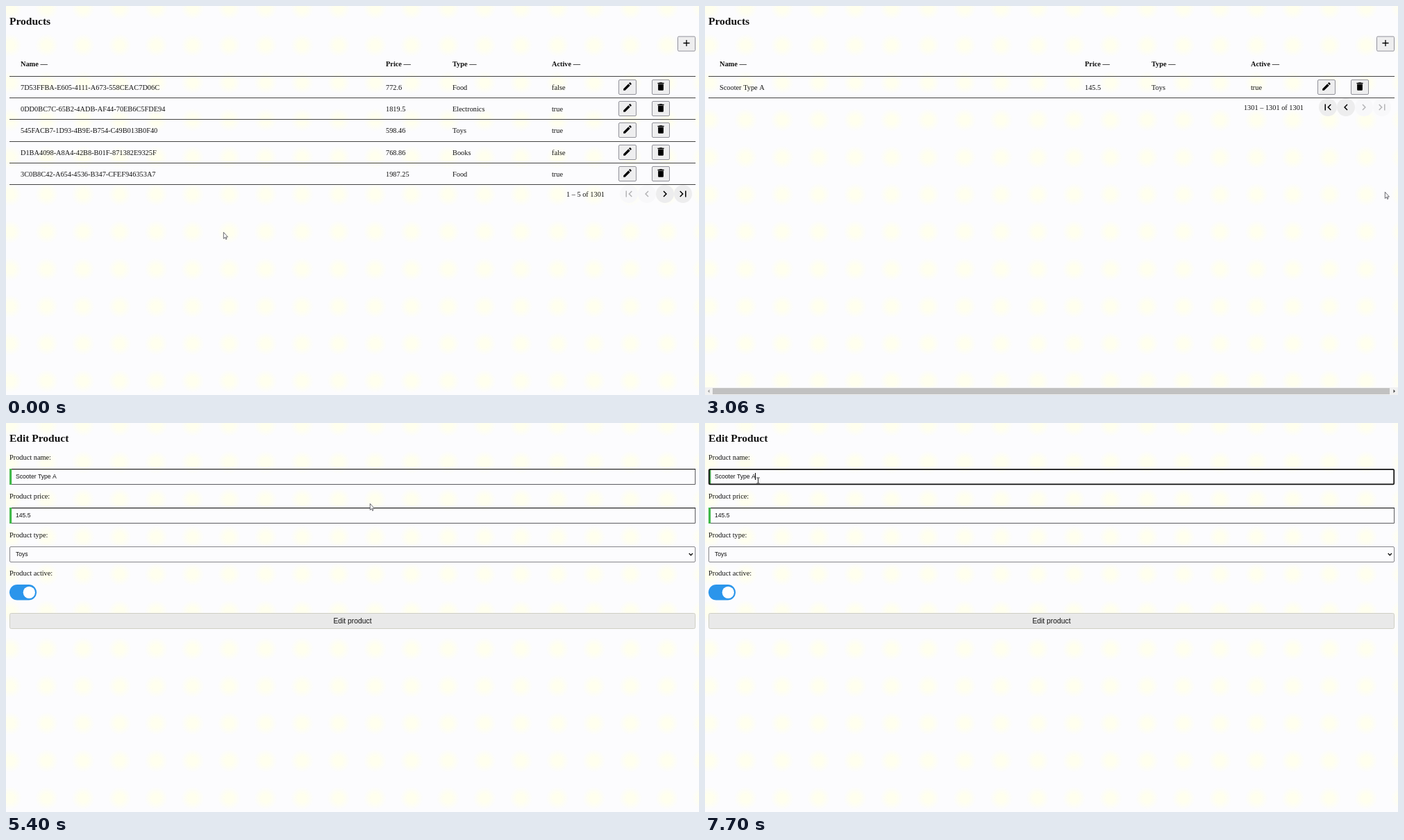
These frames come from a looping animation (998x561 px, 8000 ms). An HTML page with a canvas:

```html
<!DOCTYPE html>
<html lang="en">
<head>
<meta charset="utf-8">
<title>Products</title>
<style>
  html, body { margin: 0; width: 100%; height: 100%; overflow: hidden; background: #fcfcfe; }
  canvas { display: block; width: 998px; height: 561px; }
</style>
</head>
<body>
<canvas id="stage" width="998" height="561"></canvas>
<script>
const W = 998, H = 561, LOOP = 8000;
const ctx = document.getElementById('stage').getContext('2d');
const SERIF = '"Liberation Serif", "Times New Roman", serif';
const SANS = '"Liberation Sans", Arial, sans-serif';
const BODY = `10.33px ${SERIF}`, BOLD = `bold 10.33px ${SERIF}`;
const HEADING = `bold 15.5px ${SERIF}`, FIELD = `8.6px ${SANS}`;
const COLUMNS = [21, 547, 643, 786];

const ICONS = Object.fromEntries(Object.entries({
  add: 'M19 13h-6v6h-2v-6H5v-2h6V5h2v6h6v2z',
  edit: 'M3 17.25V21h3.75L17.81 9.94l-3.75-3.75L3 17.25zM20.71 7.04c.39-.39.39-1.02 0-1.41l-2.34-2.34c-.39-.39-1.02-.39-1.41 0l-1.83 1.83 3.75 3.75 1.83-1.83z',
  remove: 'M6 19c0 1.1.9 2 2 2h8c1.1 0 2-.9 2-2V7H6v12zM19 4h-3.5l-1-1h-5l-1 1H5v2h14V4z',
  first: 'M18.41 16.59L13.82 12l4.59-4.59L17 6l-6 6 6 6zM6 6h2v12H6z',
  previous: 'M15.41 7.41L14 6l-6 6 6 6 1.41-1.41L10.83 12z',
  next: 'M10 6L8.59 7.41 13.17 12l-4.58 4.59L10 18l6-6z',
  last: 'M5.59 7.41L10.18 12l-4.59 4.59L7 18l6-6-6-6zM16 6h2v12h-2z'
}).map(([name, d]) => [name, new Path2D(d)]));
const ARROW = new Path2D('M0 0V9.2L2.1 7.3 3.4 10.2 4.7 9.6 3.4 6.8H6.1z');

const FIRST_PAGE = [
  ['7D53FFBA-E605-4111-A673-558CEAC7D06C', '772.6', 'Food', 'false'],
  ['0DD0BC7C-65B2-4ADB-AF44-70EB6C5FDE94', '1819.5', 'Electronics', 'true'],
  ['545FACB7-1D93-4B9E-B754-C49B013B0F40', '598.46', 'Toys', 'true'],
  ['D1BA4098-A8A4-42B8-B01F-871382E9325F', '768.86', 'Books', 'false'],
  ['3C0B8C42-A654-4536-B347-CFEF946353A7', '1987.25', 'Food', 'true']
];
const LAST_PAGE = [['Scooter Type A', '145.5', 'Toys', 'true']];

// Pointer waypoints: time, x, y
const POINTER = [
  [0, 313, 326], [1200, 313, 326], [1400, 560, 308], [1600, 770, 288],
  [2000, 866, 284], [2300, 945, 274], [2560, 979, 268], [3530, 979, 268],
  [3750, 925, 245], [3960, 882, 211], [4300, 884, 117], [4850, 884, 117],
  [5250, 640, 118], [5600, 370, 114], [6000, 118, 97], [6360, 73, 82],
  [6760, 73, 82], [7560, 76, 83], [LOOP, 76, 83]
];

function pointerAt(t) {
  const i = POINTER.findIndex(p => p[0] > t);
  const [t0, x0, y0] = POINTER[i - 1], [t1, x1, y1] = POINTER[i];
  const k = (t - t0) / (t1 - t0);
  return [x0 + (x1 - x0) * k, y0 + (y1 - y0) * k];
}

function rect(x, y, w, h, color) {
  ctx.fillStyle = color;
  ctx.fillRect(x, y, w, h);
}

function box(x, y, w, h, radius, fill, stroke, line = 1) {
  ctx.beginPath();
  ctx.roundRect(x, y, w, h, radius);
  if (fill) { ctx.fillStyle = fill; ctx.fill(); }
  if (stroke) { ctx.strokeStyle = stroke; ctx.lineWidth = line; ctx.stroke(); }
}

function disc(x, y, r, color) {
  ctx.beginPath();
  ctx.arc(x, y, r, 0, 2 * Math.PI);
  ctx.fillStyle = color;
  ctx.fill();
}

function text(str, x, y, font = BODY, align = 'left') {
  ctx.font = font;
  ctx.textAlign = align;
  ctx.fillStyle = '#111';
  ctx.fillText(str, x, y);
}

function icon(name, cx, cy, size = 15.5, color = '#000') {
  ctx.save();
  ctx.translate(cx - size / 2, cy - size / 2);
  ctx.scale(size / 24, size / 24);
  ctx.fillStyle = color;
  ctx.fill(ICONS[name]);
  ctx.restore();
}

function iconButton(name, cx, cy, fill = '#eeeeef') {
  box(cx - 12.5, cy - 10.5, 25, 21, 1.5, fill, '#92929a');
  icon(name, cx, cy - 1);
}

function makeBackdrop() {
  const canvas = document.createElement('canvas');
  canvas.width = W;
  canvas.height = H;
  const c = canvas.getContext('2d');
  c.fillStyle = '#fcfcfe';
  c.fillRect(0, 0, W, H);
  for (let x = 6; x < W + 20; x += 52.55) {
    for (let y = 3; y < H + 20; y += 53.8) {
      const glow = c.createRadialGradient(x, y, 6, x, y, 17);
      glow.addColorStop(0, 'rgba(255,255,238,1)');
      glow.addColorStop(1, 'rgba(255,255,238,0)');
      c.fillStyle = glow;
      c.fillRect(x - 17, y - 17, 34, 34);
    }
  }
  return canvas;
}
const backdrop = makeBackdrop();

function paginator(y, label, onFirstPage, hoverLast) {
  text(label, 862, y + 3.5, BODY, 'right');
  ['first', 'previous', 'next', 'last'].forEach((name, i) => {
    const x = 897 + 26 * i;
    const enabled = (i > 1) === onFirstPage;
    const fill = !enabled ? '#f8f8fa' : hoverLast && name === 'last' ? '#e2e2e6' : '#ededee';
    disc(x, y, 13, fill);
    icon(name, x, y, 18, enabled ? '#000' : '#b4b4b6');
  });
}

function scrollbar() {
  rect(0, 550, W, 11, '#f1f1f1');
  rect(11, 551, 975, 9, '#c1c1c1');
  for (const [x, dir, color] of [[5.5, -1, '#a0a0a0'], [992.5, 1, '#444']]) {
    ctx.beginPath();
    ctx.moveTo(x + 1.5 * dir, 555.5);
    ctx.lineTo(x - dir, 553);
    ctx.lineTo(x - dir, 558);
    ctx.fillStyle = color;
    ctx.fill();
  }
}

function productList(t) {
  const onFirstPage = t < 2700;
  const rows = onFirstPage ? FIRST_PAGE : LAST_PAGE;
  text('Products', 5, 27, HEADING);
  iconButton('add', 980, 54.5);
  ['Name', 'Price', 'Type', 'Active'].forEach((name, i) => text(name + ' —', COLUMNS[i], 87, BOLD));
  rect(5, 101, 988, 1, '#444');
  rows.forEach((row, r) => {
    const y = 117 + 31.2 * r;
    row.forEach((value, i) => text(value, COLUMNS[i], Math.round(y + 4)));
    const pressed = !onFirstPage && t >= 4400;
    iconButton('edit', 895, Math.round(y), pressed ? '#e2e2e4' : undefined);
    iconButton('remove', 943, Math.round(y));
    rect(5, Math.round(y + 15.2), 988, 1, '#444');
  });
  if (onFirstPage) paginator(271, '1 – 5 of 1301', true, t >= 2400);
  else paginator(146, '1301 – 1301 of 1301', false, false);
  if (t >= 2700 && t < 3400) scrollbar();
}

function inputField(y, value, focused) {
  if (focused) {
    rect(6, y + 1, 2.4, 21, '#3f9f47');
    box(5.8, y + 0.8, 986.4, 21.6, 1.5, null, '#111', 1.7);
  } else {
    box(5.5, y + 0.5, 987, 22, 0, null, '#5c5c60');
    rect(5, y, 988, 1.2, '#222');
    rect(5, y, 3.2, 23, '#42b94b');
  }
  text(value, 14, y + 14, FIELD);
}

function productForm(t) {
  const focused = t >= 7600;
  text('Edit Product', 5, 27, HEADING);
  text('Product name:', 5, 53);
  text('Product price:', 5, 109);
  text('Product type:', 5, 165);
  text('Product active:', 5, 220);
  inputField(66, 'Scooter Type A', focused);
  inputField(122, '145.5', false);
  if (focused) rect(72, 72, 1, 10, '#000');

  box(5.5, 178.5, 987, 22, 1.5, null, '#85858a');
  text('Toys', 14, 192, FIELD);
  ctx.beginPath();
  ctx.moveTo(983.7, 188);
  ctx.lineTo(986.3, 190.7);
  ctx.lineTo(988.9, 188);
  ctx.strokeStyle = '#111';
  ctx.lineWidth = 1.4;
  ctx.stroke();

  box(5, 233, 39, 22.5, 11.25, '#2b95eb');
  disc(33.3, 244.3, 8.6, '#fff');

  box(5.5, 274.5, 987, 22, 2, '#e9e9e9', '#cfcfc4');
  text('Edit product', 499, 289, `10.35px ${SANS}`, 'center');
}

function pointer(t) {
  const [x, y] = pointerAt(t);
  const overInput = t >= 4800 && [66, 122].some(top => y >= top && y <= top + 23);
  if (overInput && t > 6000) {
    rect(x, y - 4, 1, 8, '#222');
    rect(x - 2, y - 4.5, 5, 1, '#555');
    rect(x - 2, y + 3.5, 5, 1, '#555');
    return;
  }
  ctx.save();
  ctx.translate(Math.round(x) + 0.3, Math.round(y) + 0.3);
  ctx.fillStyle = '#fff';
  ctx.fill(ARROW);
  ctx.strokeStyle = '#44444c';
  ctx.lineWidth = 0.8;
  ctx.stroke(ARROW);
  ctx.restore();
}

function draw(now) {
  const t = now % LOOP;
  ctx.drawImage(backdrop, 0, 0);
  if (t < 4800) productList(t);
  else productForm(t);
  pointer(t);
}

const start = performance.now();
function tick() {
  draw(performance.now() - start);
  requestAnimationFrame(tick);
}
tick();
</script>
</body>
</html>
```
